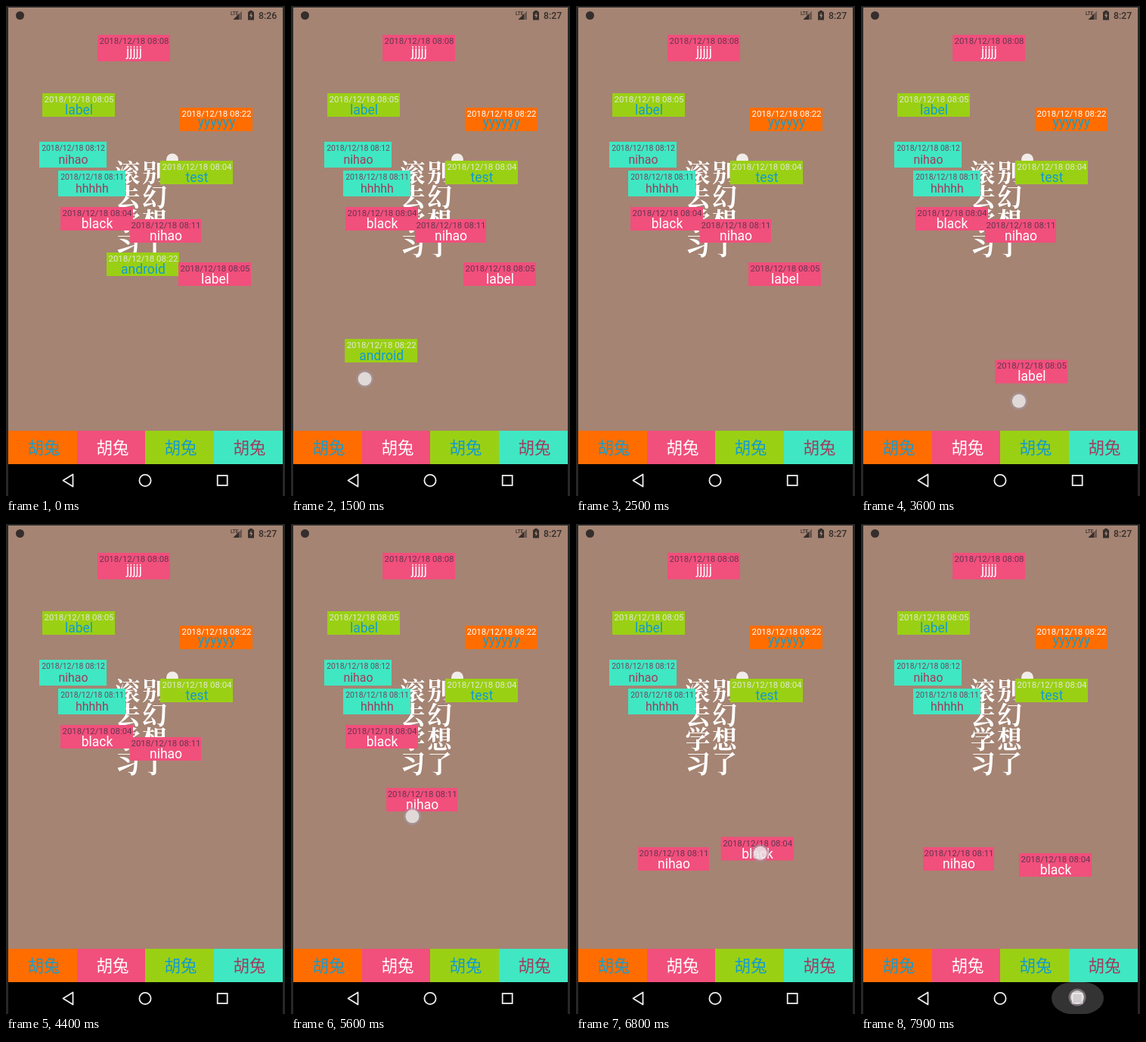
Recreate the animation shown at these times as an HTML page. Size 369x646 px, loop 8000 ms.

```html
<!DOCTYPE html>
<html lang="zh">
<head>
<meta charset="utf-8">
<title>Draggable labels</title>
<style>
html, body { margin: 0; width: 100%; height: 100%; overflow: hidden; background: #272727; }
svg { display: block; width: 100%; height: 100%; }
text { font-family: Roboto, sans-serif; }
.poem text { font: 600 33px "Noto Serif CJK SC", "Noto Sans CJK SC", serif; fill: #fff; }
.button text { font: 21.5px "Noto Sans CJK SC", "Noto Sans CJK", sans-serif; }
.label text, .button text { text-anchor: middle; }
</style>
</head>
<body>
<svg viewBox="0 0 369 646" xmlns="http://www.w3.org/2000/svg">
  <defs><clipPath id="screen"><rect x="3" y="2" width="363" height="644"/></clipPath></defs>
  <rect width="369" height="646" fill="#272727"/>
  <g clip-path="url(#screen)">
    <rect x="3" y="2" width="363" height="644" fill="#a58473"/>
    <g fill="#352e2c">
      <circle cx="18.5" cy="12.5" r="5.5"/>
      <text x="297" y="12" font-size="6.5" font-weight="500">LTE</text>
      <path d="M312 6.5V18H300.5Z" fill="#6a574e"/>
      <path d="M308 10.5V18H300.5Z"/>
      <path d="M320 7.5h2V6h4v1.5h2V18.5h-8Z"/>
      <path d="M324.7 8.5l-2.7 4.500h1.700v3.500l2.700-4.500h-1.700Z" fill="#a58473"/>
      <text id="clock" x="334" y="17" font-size="12.3" font-weight="500">8:26</text>
    </g>
    <g class="poem" id="poem"></g>
    <circle cx="220" cy="202.5" r="8" fill="#f1ece9"/>
    <g class="button" id="buttons"></g>
    <rect x="3" y="604" width="363" height="42" fill="#000"/>
    <rect id="ripple" x="252" y="604" width="69" height="42" rx="27" ry="21" fill="#333"/>
    <g fill="none" stroke="#eee" stroke-width="1.8">
      <path d="M88.500 617.500V633.500L75.500 625.500Z" stroke-linejoin="round"/>
      <circle cx="184" cy="625.5" r="7.6"/>
      <rect x="279.700" y="619" width="13" height="13"/>
    </g>
    <g class="label" id="labels"></g>
    <g id="touch">
      <circle r="11.5" fill="#a596a0" opacity=".6"/>
      <circle r="9" fill="#fff" opacity=".66"/>
    </g>
  </g>
</svg>
<script>
const LOOP = 8000, TICK = 100;
const $ = id => document.getElementById(id);

function add(parent, tag, attrs, text = '') {
  const node = document.createElementNS('http://www.w3.org/2000/svg', tag);
  for (const key in attrs) node.setAttribute(key, attrs[key]);
  node.textContent = text;
  parent.appendChild(node);
  return node;
}

const moveTo = (node, x, y) => node.setAttribute('transform', `translate(${x} ${y})`);

const themes = {
  orange: { box: '#ff6d00', main: '#1a9ac8', date: '#fff' },
  pink: { box: '#f14f7c', main: '#fff', date: '#64354f' },
  green: { box: '#9ad014', main: '#109bd2', date: '#e3e7d8' },
  teal: { box: '#40e7c3', main: '#a03c5c', date: '#71465c' }
};

['滚别', '去幻', '学想', '习了'].forEach((row, r) =>
  [...row].forEach((char, c) =>
    add($('poem'), 'text', { x: 144.5 + c * 35.5, y: 231.5 + r * 32.3 }, char)));

Object.values(themes).forEach((theme, i) => {
  const x = Math.round(3 + i * 90.5);
  add($('buttons'), 'rect', { x, y: 560, width: 91, height: 44, fill: theme.box });
  add($('buttons'), 'text', { x: x + 47, y: 590, fill: theme.main }, '胡兔');
});

function makeLabel(name, time, color, x, y, { w = 96, h = 31, base = 28, size = 17.5 } = {}) {
  const theme = themes[color];
  const node = add($('labels'), 'g');
  const line = (text, lineY, fontSize, fill) =>
    add(node, 'text', { x: w / 2 + 0.5, y: lineY, 'font-size': fontSize, fill }, text);
  add(node, 'rect', { width: w, height: h, fill: theme.box });
  line('2018/12/18 ' + time, 12, size * 0.653, theme.date);
  line(name, base, size, theme.main);
  moveTo(node, x, y);
  return { node, x, y };
}

const small = { w: 89, h: 34, base: 29, size: 15.9 };
makeLabel('jjjjj', '08:08', 'pink', 121, 38, { h: 35 });
makeLabel('label', '08:05', 'green', 48, 115);
makeLabel('yyyyyy', '08:22', 'orange', 230, 134, { base: 25 });
makeLabel('nihao', '08:12', 'teal', 44, 179, small);
makeLabel('hhhhh', '08:11', 'teal', 69, 217, small);
makeLabel('test', '08:04', 'green', 204, 204);
const black = makeLabel('black', '08:04', 'pink', 72, 265);
const nihao = makeLabel('nihao', '08:11', 'pink', 164, 281, { w: 94 });
const android = makeLabel('android', '08:22', 'green', 133, 325);
const label = makeLabel('label', '08:05', 'pink', 228, 338);

// lead: how far the finger runs ahead of its label, in ms
const drags = [
  { item: android, to: [1, 568], start: 1200, time: 800, lead: 90, release: 2200, gone: 2500 },
  { item: label, to: [135, 574], start: 3300, time: 700, lead: 90, release: 4200, gone: 4400 },
  { item: nihao, to: [82, 426], start: 5400, time: 540, lead: 60, release: 6000 },
  { item: black, to: [209, 434], start: 6500, time: 420, lead: 20, release: 7200 }
];

function dragPoint({ item, to, start, time }, t) {
  const u = Math.min(1, Math.max(0, (t - start) / time)) ** 0.75;
  const k = u * u * (3 - 2 * u);
  return [item.x + (to[0] - item.x) * k, item.y + (to[1] - item.y) * k];
}

function draw(now) {
  const t = Math.floor(now % LOOP / TICK) * TICK;
  const touch = $('touch');
  const recents = t >= 7900;
  let pressed = recents;
  if (recents) moveTo(touch, 286, 624);

  for (const drag of drags) {
    const { item, start, lead, release, gone = Infinity } = drag;
    moveTo(item.node, ...dragPoint(drag, t));
    item.node.setAttribute('opacity', t >= gone ? 0 : t >= gone - TICK ? 0.5 : 1);
    if (t >= start && t < release) {
      const [x, y] = dragPoint(drag, t + lead);
      moveTo(touch, x + 47, y + 15);
      pressed = true;
    }
  }
  touch.setAttribute('opacity', pressed ? 1 : 0);
  $('ripple').setAttribute('opacity', recents ? 1 : 0);
  $('clock').textContent = t < 1000 ? '8:26' : '8:27';
}

const began = performance.now();
function loop() {
  draw(performance.now() - began);
  requestAnimationFrame(loop);
}
loop();
</script>
</body>
</html>
```
